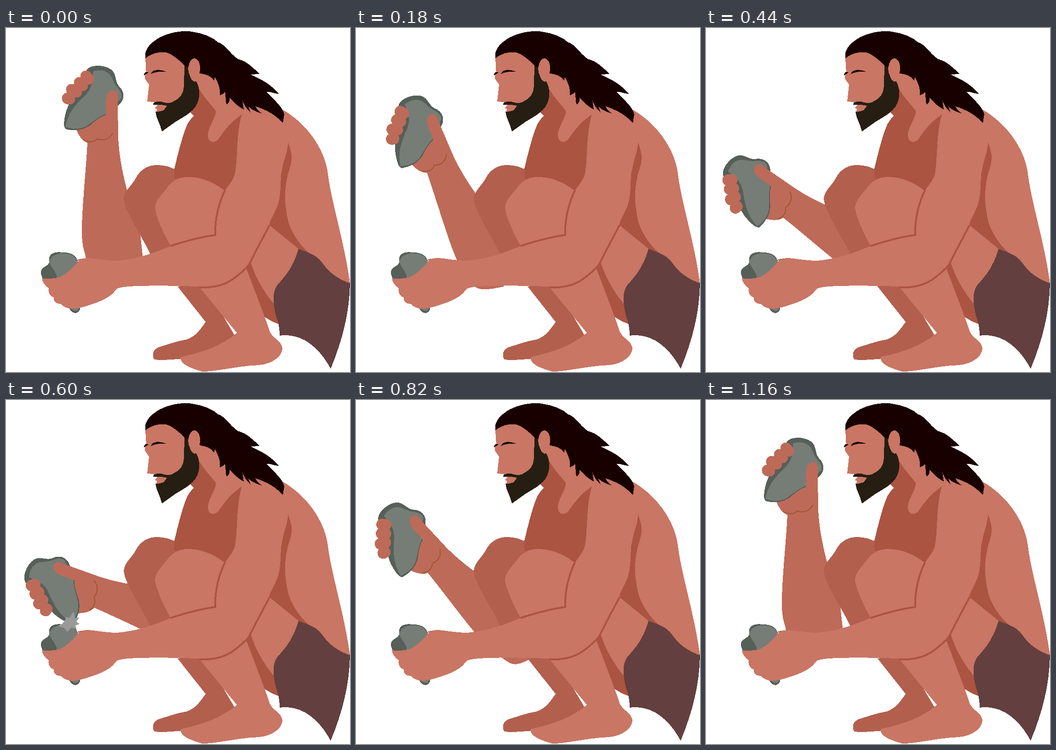
An HTML page that plays this animation: 748 by 748 pixels, repeating every 1180 ms.

```html
<!DOCTYPE html>
<html lang="en">
<head>
<meta charset="utf-8">
<title>Knapping stone</title>
<style>
  html, body { margin: 0; width: 100%; height: 100%; overflow: hidden; background: #fff; }
  svg { display: block; width: 100vw; height: 100vh; shape-rendering: crispEdges; }
  .skin { fill: #c97664; }
  .shade { fill: #ab5441; }
  .leg { fill: #b35f4e; }
  .arm { fill: #be6a58; }
  .hair { fill: #190000; }
  .beard { fill: #261e12; }
  .cloth { fill: #633f3f; }
  .stone { fill: #767d76; }
  .rock { fill: #565f58; }
  .spark { fill: #999; }
  .line { fill: none; stroke: #ab5441; stroke-width: 4; }
  .crease { fill: none; stroke: #9d5530; stroke-width: 2; }
  .fingers { stroke: #be6a58; stroke-width: 25; stroke-linecap: round; }
</style>
</head>
<body>
<svg viewBox="0 0 748 748">
  <g id="swing">
    <path class="arm" d="M153 221C158 234 166 246 177 250C174 310 165 390 165 440C165 470 168 478 172 492C176 512 178 520 186 526C196 534 215 538 236 542L300 520L290 430L262 348C252 310 245 270 244 235L243 165L217 180Z"/>
    <path class="rock" d="M175 92C180 82 200 80 215 84C228 88 233 93 236 100C240 112 239 118 245 126C253 133 257 143 255 152C252 163 246 166 242 170L217 189C202 194 190 205 181 213C165 223 150 224 130 220C123 215 127 195 131 180C136 168 150 130 175 92Z"/>
    <path class="stone" d="M189 94C200 91 212 91 219 96C231 103 231 113 238 124C247 135 254 143 251 153L216 187C200 193 187 206 174 214C160 221 146 221 129 215C131 203 136 191 142 181C150 168 158 161 167 151C182 138 190 125 189 94Z"/>
    <path class="arm" d="M217 192C219 168 214 149 224 139C233 132 244 135 243 150V240L217 230Z"/>
    <path class="crease" d="M168 242C178 250 192 249 198 241C212 247 226 241 232 228"/>
    <path class="fingers" d="M174 105L179 111M160 119L166 125M143 134L153 139M134 153L138 154"/>
  </g>

  <path class="leg" d="M373 562L434 639C420 660 410 671 394 677C370 681 345 690 330 695C317 701 318 716 323 721C340 723 360 721 385 719L510 690L430 555Z"/>
  <path class="leg" d="M256 372C257 354 274 342 282 327C294 303 315 297 332 298C350 299 360 304 367 307L400 350L380 480L314 492C300 460 258 400 256 372Z"/>
  <path class="skin" d="M400 70L470 100L604 179C650 206 690 257 699 310C706 375 735 460 748 555L690 540L540 530L500 320L430 250Z"/>
  <path class="shade" d="M410 105C416 138 441 160 456 180C458 195 438 215 439 235C440 250 455 252 463 240C475 222 490 203 514 187L540 300L478 360L366 327V306C375 268 385 230 394 210C399 201 404 195 409 191L401 184L408 140Z"/>
  <path class="skin" d="M324 390C325 375 339 362 349 349C363 328 383 323 400 324C432 325 458 340 477 355L480 450L358 474C345 450 325 410 324 390Z"/>
  <path class="shade" d="M613 248C623 274 623 288 617 305C605 340 603 380 615 425C625 453 645 480 666 495L636 482L572 430L585 380Z"/>
  <path class="shade" d="M515 520L540 500L590 595L597 645C580 640 570 633 562 628L545 615Z"/>
  <path class="skin" d="M572 428L637 481L610 560L583 601C563 577 544 547 532 510Z"/>
  <path class="skin" d="M421 564L502 663C470 690 430 705 381 715C376 726 390 737 427 747C455 748 500 735 550 733C582 730 602 712 601 695C598 680 581 675 574 661C562 625 543 577 522 521L480 545Z"/>

  <path class="rock" d="M94 499C97 488 110 486 122 488C136 487 151 493 154 502L158 515L161 612C156 622 147 623 139 612L82 548C75 537 75 531 77 526C82 517 92 518 94 510Z"/>
  <path class="stone" d="M96 514C91 500 106 490 122 490C138 489 150 495 154 505L158 512L118 546L110 544C112 535 104 528 96 514ZM139 606H160L156 614Q148 619 139 606Z"/>
  <path class="crease" d="M155 505L168 502"/>
  <path class="skin" d="M78 544C90 546 105 545 117 542C132 534 146 522 156 508C161 502 170 500 180 500C200 502 220 506 240 506C285 503 320 490 358 474C390 465 420 455 455 451C455 410 460 380 476 354C485 340 497 327 498 316C504 285 500 230 513 187L613 248C614 270 601 290 598 318C597 345 597 370 590 388C574 423 550 465 536 497C526 520 503 543 480 553C455 564 420 562 380 561C340 560 280 560 257 563Q243 565 240 568C232 580 220 588 200 596C180 603 165 609 143 611C132 609 125 607 119 600C109 600 102 594 104 586C94 582 91 574 93 566C84 560 79 552 78 544Z"/>
  <path class="line" d="M476 353C461 385 454 415 455 450C420 455 385 465 358 474M420 564C470 566 492 551 522 522"/>
  <path class="line" d="M520 524Q530 515 538 495L573 429"/>
  <path class="cloth" d="M636 480C660 490 674 492 688 511C705 535 725 547 748 555C747 620 731 680 706 741C690 710 660 676 625 670C610 667 602 668 595 669C595 650 592 640 587 625C579 595 580 572 590 559C607 540 625 520 636 480Z"/>

  <path class="skin" d="M303 60L304 88C307 98 300 104 302 110L311 123L307 160L321 161L330 168L323 174C331 176 327 178 327 182L345 182L400 140L412 100L390 70L348 48Z"/>
  <path class="beard" d="M388 82L398 84C400 98 406 112 411 112C421 125 421 143 419 155C413 180 390 191 370 203L339 225C336 210 326 195 325 182C332 183 338 180 343 179L350 169C340 166 330 168 320 167C319 160 328 160 337 160C345 163 352 164 360 162C372 155 386 150 387 125Z"/>
  <path class="hair" d="M303 66C300 45 315 32 335 20C360 8 385 5 405 8C430 12 450 20 461 31C475 34 487 56 505 68C523 71 536 86 552 100L532 101C553 111 575 121 593 143C584 143 575 138 566 139C582 155 602 172 605 188L602 207C585 187 565 178 542 170C546 178 552 183 557 186C545 183 535 178 527 171L532 184C522 175 517 166 514 157L517 177C504 171 494 160 486 151C487 156 486 163 480 166C476 160 479 150 476 138C475 142 470 145 465 146C467 130 460 118 454 106L453 115C446 103 434 101 419 98L396 86L390 83C375 68 360 56 348 53C335 51 315 55 303 66Z"/>
  <path class="skin" d="M396 87C398 74 403 66 410 66C419 67 423 80 422 91C421 99 418 115 410 117C402 115 400 104 397 96Z"/>
  <path class="hair" d="M315 100C318 91 330 88 349 95C336 94 326 95 315 100ZM300 103C300 97 304 94 310 97C306 98 305 101 300 103Z"/>
  <path id="spark" class="spark" d="M113 491C125 487 131 479 130 471L138 474L147 459L150 474L159 473L153 482L160 487L151 490L154 499L142 495L133 504L127 496Z"/>
</svg>
<script>
  const LOOP = 1180, STEP = 20, HIT = 580, SPEED = 0.124;
  const swing = document.getElementById('swing');
  const spark = document.getElementById('spark');

  function draw(now) {
    const t = Math.floor(now % LOOP / STEP) * STEP;
    const fromHit = Math.abs(t - HIT);
    swing.setAttribute('transform', `rotate(${-SPEED * (HIT - fromHit)} 330 340)`);
    spark.style.display = fromHit <= STEP ? '' : 'none';
  }

  function tick() {
    draw(performance.now());
    requestAnimationFrame(tick);
  }
  tick();
</script>
</body>
</html>
```
